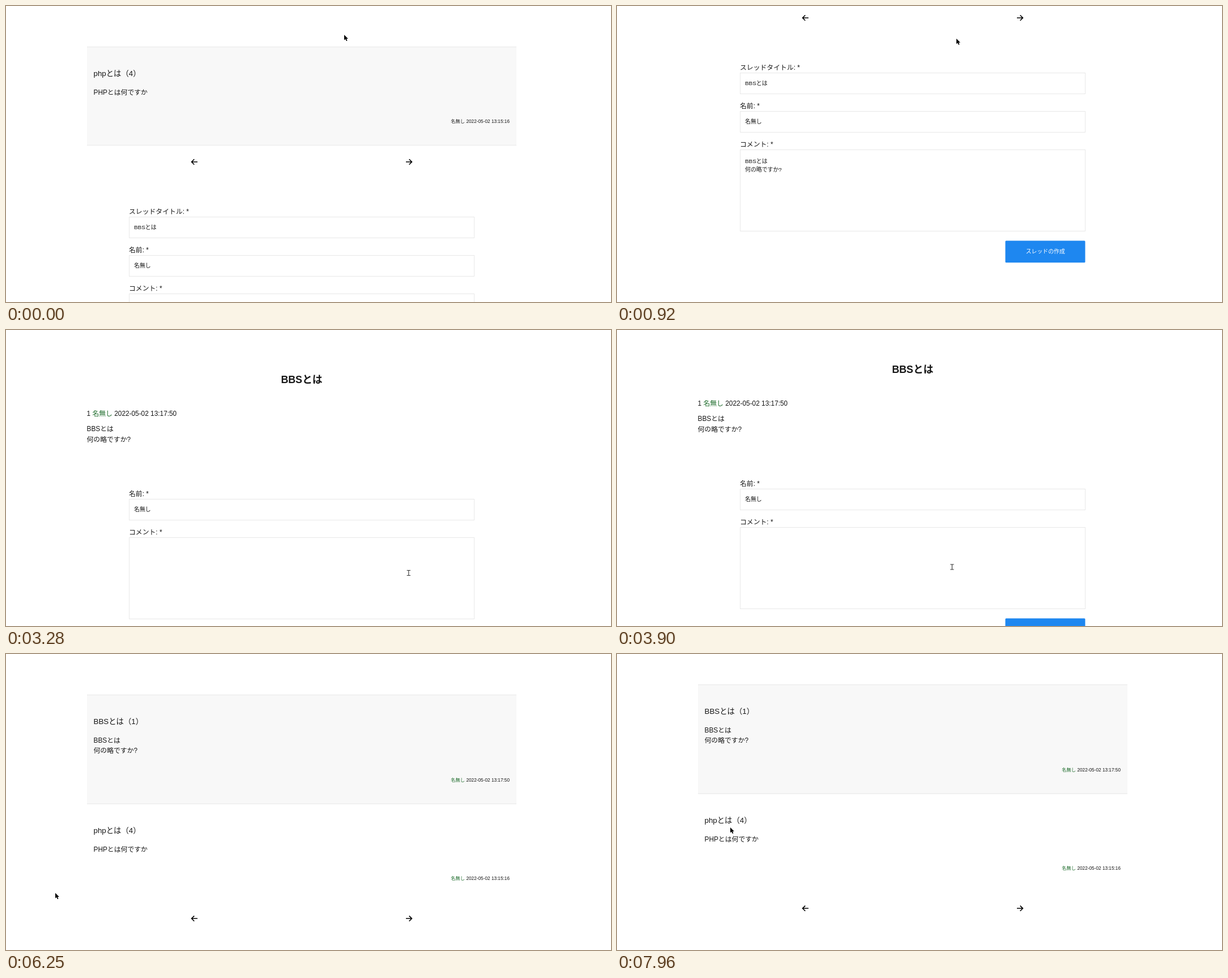
An HTML page for the animation above (7.99 s loop, 1068 by 524 pixels).

```html
<!DOCTYPE html>
<html lang="ja">
<head>
<meta charset="utf-8">
<title>BBS</title>
<style>
html, body { margin: 0; width: 100%; height: 100%; overflow: hidden; background: #fff; }
svg { display: block; width: 1068px; height: 524px; }
text { font-family: "Liberation Sans", "Noto Sans CJK JP", sans-serif; fill: #161616; white-space: pre; }
.box { fill: #fff; stroke: #e8e8e8; }
.icon { fill: none; stroke: #000; stroke-width: 1.6; }
</style>
</head>
<body>
<svg id="stage" viewBox="0 0 1068 524"></svg>
<script>
const LOOP = 7990, TICK = 30;
const TITLE = 17.8, HEAD = 13.35, BODY = 11.85, INPUT = 9.9, META = 8.25;
const GREEN = '#1c6b2a', GAP = 18.8;
const stage = document.getElementById('stage');

// y is the optical middle of the line
const text = (x, y, size, str, attrs = '') =>
  `<text x="${x}" y="${y + size * 0.38}" font-size="${size}" ${attrs}>${str}</text>`;

const lines = (x, y, size, gap, list) =>
  list.map((str, i) => text(x, y + i * gap, size, str)).join('');

const author = color => `<tspan style="fill:${color}">名無し</tspan>`;

const box = (y, h) => `<rect class="box" x="217.5" y="${y + 0.5}" width="609" height="${h}"/>`;

const field = (y, label, value) =>
  text(217, y, BODY, label + ': *') + box(y + 10, 37) + text(226, y + 28, INPUT, value);

const area = (y, label, value, button) =>
  text(217, y, BODY, label + ': *') + box(y + 10, 144) + lines(226, y + 30, INPUT, 15, value) +
  `<rect x="685.5" y="${y + 171.6}" width="141" height="38.6" rx="1.5" fill="#1e87f0"/>` +
  text(756.3, y + 190.7, INPUT, button, 'text-anchor="middle" style="fill:#fff"');

function thread(y, title, body, date, shaded, nameColor) {
  const extra = GAP * (body.length - 1);
  const panel = shaded
    ? `<rect x="143" y="${y}" width="758" height="${175 + extra}" fill="#f8f8f8"/>
       <path d="M143 ${y + 0.4}h758m0 ${174 + extra}h-758" stroke="#e8e8e8"/>` : '';
  return panel + text(154.5, y + 47, HEAD, title) + lines(154.5, y + 80, BODY, GAP, body) +
    text(889, y + 132 + extra, META, `${author(nameColor)} ${date}`, 'text-anchor="end"');
}

const pager = y => `<path class="icon" d="M338 ${y}H327.8M332.3 ${y - 4.7}l-4.7 4.7 4.7 4.7
  M706 ${y}h10.2M711.7 ${y - 4.7}l4.7 4.7 -4.7 4.7"/>`;

const question = ['BBSとは', '何の略ですか?'];
const phpThread = (y, shaded, color) =>
  thread(y, 'phpとは（4）', ['PHPとは何ですか'], '2022-05-02 13:15:16', shaded, color);

const pages = {
  create: phpThread(72, true, '#222') + pager(276) +
    field(363, 'スレッドタイトル', 'BBSとは') + field(431, '名前', '名無し') +
    area(499, 'コメント', question, 'スレッドの作成'),
  detail: text(522, 87.5, TITLE, 'BBSとは', 'text-anchor="middle" font-weight="bold"') +
    text(142.5, 147, BODY, `1 ${author(GREEN)} 2022-05-02 13:17:50`) +
    lines(142.5, 174.8, BODY, GAP, question) +
    field(289, '名前', '名無し') + area(357, 'コメント', [], 'コメントの送信') +
    text(76, 577, BODY, 'スレッド一覧に戻る', 'text-anchor="end" text-decoration="underline" style="fill:#1f0fb4"'),
  list: thread(72, 'BBSとは（1）', question, '2022-05-02 13:17:50', true, GREEN) +
    phpThread(265, false, GREEN) + pager(468.3)
};

const cursors = {
  arrow: `<path d="M0 0V9.6L2.2 7.6 3.8 11 5.5 10.2 4 7H6.9Z" fill="#000" stroke="#fff"
    stroke-width="1.4" paint-order="stroke"/>`,
  beam: `<path d="M-3 -4.5H3.4M.2 -4.5V4.5M-3 4.5H3.4" fill="none" stroke="#333" stroke-width="1.1"/>`,
  hand: `<path d="M-1 1Q0 -.6 1 1V5L5 6Q6 6.3 6 7.5V10L4.8 13.4H-1.2L-3.6 9.2Q-3.8 7.6 -2.2 8L-1 9Z"
    fill="#fff" stroke="#000" stroke-width=".9"/>`
};

// each page appears at `at` and scrolls by `by` between `from` and `to`
const views = [
  { at: 0, page: 'create', from: 10, to: 210, by: 255 },
  { at: 2720, page: 'detail', from: 3873, to: 3990, by: 132 },
  { at: 5500, page: 'list', from: 7920, to: 7950, by: 18 }
];

// from, to, x, y, cursor: each move starts where the one before ended
const moves = [
  [0, 0, 597, 51, 'arrow'],
  [880, 1180, 639, 183, 'arrow'],
  [1340, 1630, 674, 305, 'arrow'],
  [1840, 2320, 711, 416, 'arrow'],
  [2330, 2620, 711, 430, 'hand'],
  [3270, 3600, 591.3, 419.5, 'beam'],
  [4270, 4460, 346, 449, 'arrow'],
  [4670, 4830, 117, 416, 'arrow'],
  [4900, 5300, 78, 444, 'arrow'],
  [5300, 5470, 70, 441, 'hand'],
  [6220, 6250, 87, 423, 'arrow'],
  [6250, 6490, 217, 368, 'arrow'],
  [6810, 7160, 211, 335, 'arrow'],
  [7440, 7920, 200, 307, 'arrow']
];

function ease(t, from, to) {
  const p = to > from ? Math.min(1, Math.max(0, (t - from) / (to - from))) : 1;
  return p * p * (3 - 2 * p);
}

function cursorAt(t) {
  const i = moves.findLastIndex(m => m[0] <= t);
  const [from, to, x, y, shape] = moves[i];
  const [, , x0, y0] = moves[Math.max(0, i - 1)];
  const p = ease(t, from, to);
  return [shape, x0 + (x - x0) * p, y0 + (y - y0) * p];
}

const groups = set => Object.entries(set).map(([id, body]) => `<g id="${id}">${body}</g>`).join('');
stage.innerHTML = groups(pages) + groups(cursors);

function showOnly(set, name, x, y) {
  for (const id in set) {
    const g = document.getElementById(id);
    g.style.display = id === name ? '' : 'none';
    if (id === name) g.setAttribute('transform', `translate(${x} ${y})`);
  }
}

function draw() {
  const t = performance.now() % LOOP;
  const view = views.findLast(v => v.at <= t);
  const tick = Math.floor(t / TICK) * TICK;
  const scroll = Math.round(view.by * ease(tick, view.from, view.to));
  showOnly(pages, view.page, 0, -scroll);
  showOnly(cursors, ...cursorAt(t));
  requestAnimationFrame(draw);
}
draw();
</script>
</body>
</html>
```
